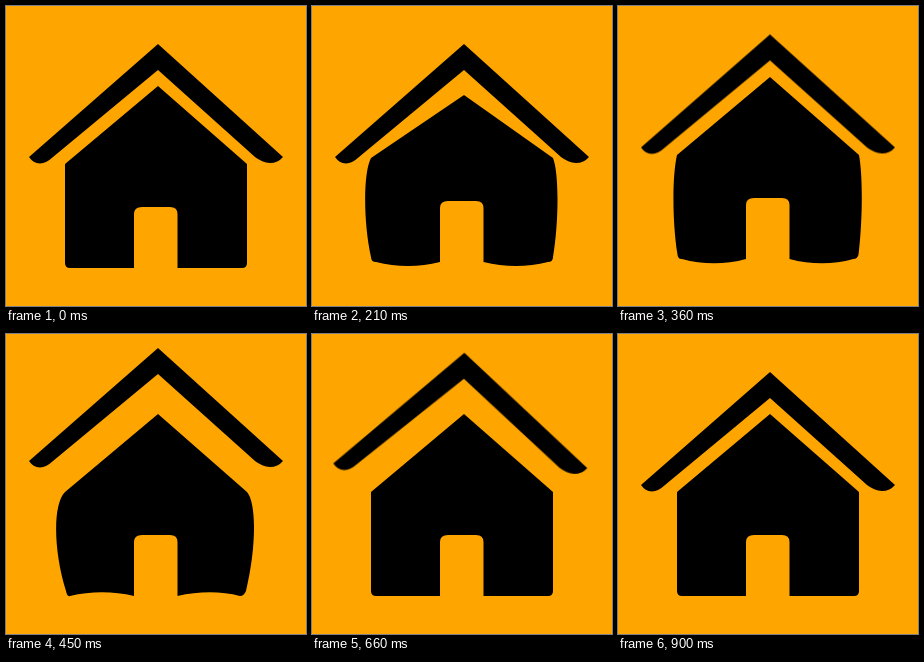
Write an HTML page without scripts that moves like this. It is 300 px wide and 300 px high and loops after 0.96 s.

```html
<!DOCTYPE html>
<html lang="en">
<head>
<meta charset="utf-8">
<title>Bouncing house</title>
<style>
  html, body { margin: 0; width: 100%; height: 100%; overflow: hidden; background: #ffa500; }
  svg { display: block; width: 100%; height: 100%; }

  /* Six beats of 150 ms, five steps each, then a 60 ms rest */
  .roof, .walls { animation: 960ms steps(5, end) -1ms infinite; }
  .roof { animation-name: hop; transform-origin: 152px 59px; }
  .walls { animation-name: squash; }

  @keyframes hop {
    0%, 31.25% { transform: translateY(0) rotate(0deg); }
    46.875% { transform: translateY(-24px) rotate(0deg); }
    62.5% { transform: translateY(-24px) rotate(5.3deg); }
    78.125% { transform: translateY(-12px) rotate(-5.3deg); }
    93.75%, 100% { transform: translateY(0) rotate(0deg); }
  }

  @keyframes squash {
    0%, 62.5%, 100% {
      transform: translateY(0);
      d: path("M152 80 L241 158 C241 185 241 230 241 257 Q241 262 236 262 C215 262 193 262 171.5 262 V208 Q171.5 201 164 201 H136 Q128 201 128 208 V262 C107 262 85 262 64 262 Q59 262 59 257 C59 230 59 185 59 158 Z");
    }
    15.625% {
      transform: translateY(0);
      d: path("M152 105 L241 158 C251 165 251 215 241 257 Q241 262 236 262 C215 262 193 262 171.5 262 V208 Q171.5 201 164 201 H136 Q128 201 128 208 V262 C107 262 85 262 64 262 Q59 262 59 257 C46 215 46 165 59 158 Z");
    }
    31.25% {
      transform: translateY(-15px);
      d: path("M152 80 L241 158 C241 185 241 230 241 257 Q241 262 236 262 C215 275 193 275 171.5 262 V208 Q171.5 201 164 201 H136 Q128 201 128 208 V262 C107 275 85 275 64 262 Q59 262 59 257 C59 230 59 185 59 158 Z");
    }
    46.875% {
      transform: translateY(0);
      d: path("M152 80 L241 158 C251 170 250 215 240 257 Q238 262 234 262 C215 257 193 257 171.5 262 V208 Q171.5 201 164 201 H136 Q128 201 128 208 V262 C107 257 85 257 64 262 Q61 263 60 257 C47 215 47 170 59 158 Z");
    }
  }
</style>
</head>
<body>
<svg viewBox="0 0 300 300">
  <path class="walls" d="M152 80 L241 158 C241 185 241 230 241 257 Q241 262 236 262 C215 262 193 262 171.5 262 V208 Q171.5 201 164 201 H136 Q128 201 128 208 V262 C107 262 85 262 64 262 Q59 262 59 257 C59 230 59 185 59 158 Z"/>
  <path class="roof" d="M152 38 L277 151 Q272 157 264 157 Q256 156.5 249 151 L152 64 L47 151 Q40 157.5 34 157.5 Q27 157 23 151 Z"/>
</svg>
</body>
</html>
```
